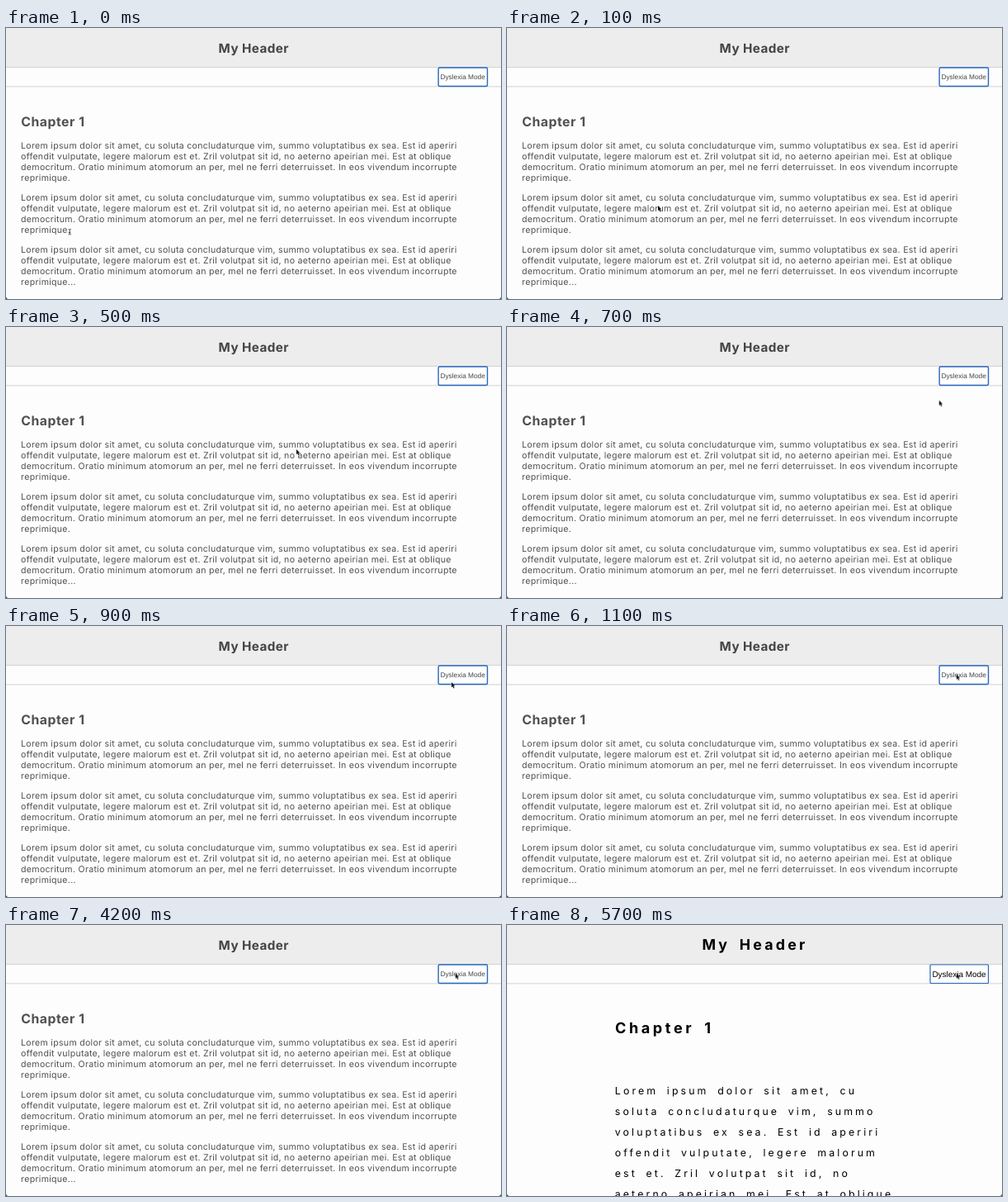
These frames come from a looping animation (600x328 px, 8.1 s). An HTML page:

```html
<!DOCTYPE html>
<html lang="en">
<head>
<meta charset="utf-8">
<title>Dyslexia Mode</title>
<style>
  html, body { margin: 0; width: 100%; height: 100%; overflow: hidden; background: #fdfdfd; }
  svg {
    display: block;
    width: 600px;
    height: 328px;
    font-family: Inter, sans-serif;
    font-optical-sizing: none;
    text-rendering: geometricPrecision;
  }

  /* Sizes sit on the groups so that reused paragraphs inherit them. */
  .plain {
    fill: #505050;
    font-size: 10.6px;
    letter-spacing: .28px;
    animation: plain 8.1s step-end infinite;
  }
  .plain .title { font-size: 15.3px; font-weight: 700; letter-spacing: .38px; fill: #444; }
  .plain .chapter { font-size: 15.8px; font-weight: 700; letter-spacing: .53px; }

  .spaced {
    fill: #000;
    font-size: 12.35px;
    letter-spacing: 3.1px;
    word-spacing: 4.1px;
    visibility: hidden;
    animation: spaced 8.1s step-end infinite;
  }
  .spaced .title { font-size: 17.8px; font-weight: 700; letter-spacing: 3.2px; }
  .spaced .chapter { font-size: 18.1px; font-weight: 700; letter-spacing: 3.6px; }

  .plain .label, .spaced .label {
    font-family: "Liberation Sans", Arial, sans-serif;
    letter-spacing: 0;
    word-spacing: 0;
  }
  .plain .label { font-size: 8.3px; fill: #444; }
  .spaced .label { font-size: 9.95px; }
  .button { fill: #fff; stroke: #2a68ba; }

  .beam { animation: beam 8.1s step-end infinite; }
  .arrow { animation: arrow 8.1s step-end infinite; }

  @keyframes plain {
    0%, 51.851% { visibility: visible; }
    22.222%, 70.37%, 100% { visibility: hidden; }
  }
  @keyframes spaced {
    0%, 51.851% { visibility: hidden; }
    22.222%, 70.37%, 100% { visibility: visible; }
  }
  @keyframes beam {
    0% { visibility: visible; }
    1.234%, 100% { visibility: hidden; }
  }
  @keyframes arrow {
    0% { visibility: hidden; transform: translate(76px, 243px); }
    1.234% { visibility: visible; transform: translate(183px, 215px); }
    2.469% { transform: translate(265px, 179.5px); }
    6.172% { transform: translate(352px, 148px); }
    7.407% { transform: translate(464px, 110px); }
    8.641% { transform: translate(523.7px, 88.7px); }
    9.876% { transform: translate(534px, 77px); }
    11.111% { transform: translate(540px, 68px); }
    12.345% { transform: translate(543.5px, 62px); }
    13.58%, 100% { visibility: visible; transform: translate(544.8px, 58.5px); }
  }
</style>
</head>
<body>
<svg viewBox="0 0 600 328">
  <defs>
    <g id="para">
      <text x="18.1" y="145.8">Lorem ipsum dolor sit amet, cu soluta concludaturque vim, summo voluptatibus ex sea. Est id aperiri</text>
      <text x="18.1" y="158.9">offendit vulputate, legere malorum est et. Zril volutpat sit id, no aeterno apeirian mei. Est at oblique</text>
      <text x="18.1" y="172.1">democritum. Oratio minimum atomorum an per, mel ne ferri deterruisset. In eos vivendum incorrupte</text>
    </g>
  </defs>

  <rect width="600" height="328" fill="#fdfdfd"/>
  <rect width="600" height="47" fill="#ededed"/>
  <path d="M0 47.5H600M0 70.9H600" stroke="#d2d2d2"/>

  <g class="plain">
    <text class="title" x="257.6" y="29.6">My Header</text>
    <rect class="button" x="524.1" y="48" width="59.4" height="22.5" rx="1.5" stroke-width="1.4"/>
    <text class="label" x="526.4" y="62.1">Dyslexia Mode</text>
    <text class="chapter" x="18.2" y="118.6">Chapter 1</text>
    <use href="#para"/>
    <text x="18.1" y="185.2">reprimique.</text>
    <use href="#para" y="63.1"/>
    <text x="18.1" y="248.3">reprimique.</text>
    <use href="#para" y="126.2"/>
    <text x="18.1" y="311.4">reprimique...</text>
  </g>

  <g class="spaced">
    <text class="title" x="236.4" y="30.2">My Header</text>
    <rect class="button" x="513" y="48" width="70.5" height="22.5" rx="1" stroke-width="1.2"/>
    <text class="label" x="515.4" y="63">Dyslexia Mode</text>
    <text class="chapter" x="130.9" y="130.6">Chapter 1</text>
    <text x="130.8" y="204.5">Lorem ipsum dolor sit amet, cu</text>
    <text x="130.8" y="229.6">soluta concludaturque vim, summo</text>
    <text x="130.8" y="254.7">voluptatibus ex sea. Est id aperiri</text>
    <text x="130.8" y="279.8">offendit vulputate, legere malorum</text>
    <text x="130.8" y="304.9">est et. Zril volutpat sit id, no</text>
    <text x="130.8" y="330">aeterno apeirian mei. Est at oblique</text>
  </g>

  <path d="M0 325.5V328H2.5Q.4 327.6 0 325.5ZM600 325.5V328H597.5Q599.6 327.6 600 325.5Z" fill="#333"/>

  <path class="beam" d="M75.6 243.5Q77.3 243.5 77.3 244.6V248.9Q77.3 250 75.6 250M79 243.5Q77.3 243.5 77.3 244.6M77.3 248.9Q77.3 250 79 250M76.3 247.6H78.3" fill="none" stroke="#333" stroke-width=".8"/>
  <path class="arrow" d="M0 0V6.2L1.4 5L2.5 7.5L3.6 7L2.5 4.6H4.4Z" fill="#111" stroke="#fff" stroke-width=".5" paint-order="stroke"/>
</svg>
</body>
</html>
```
